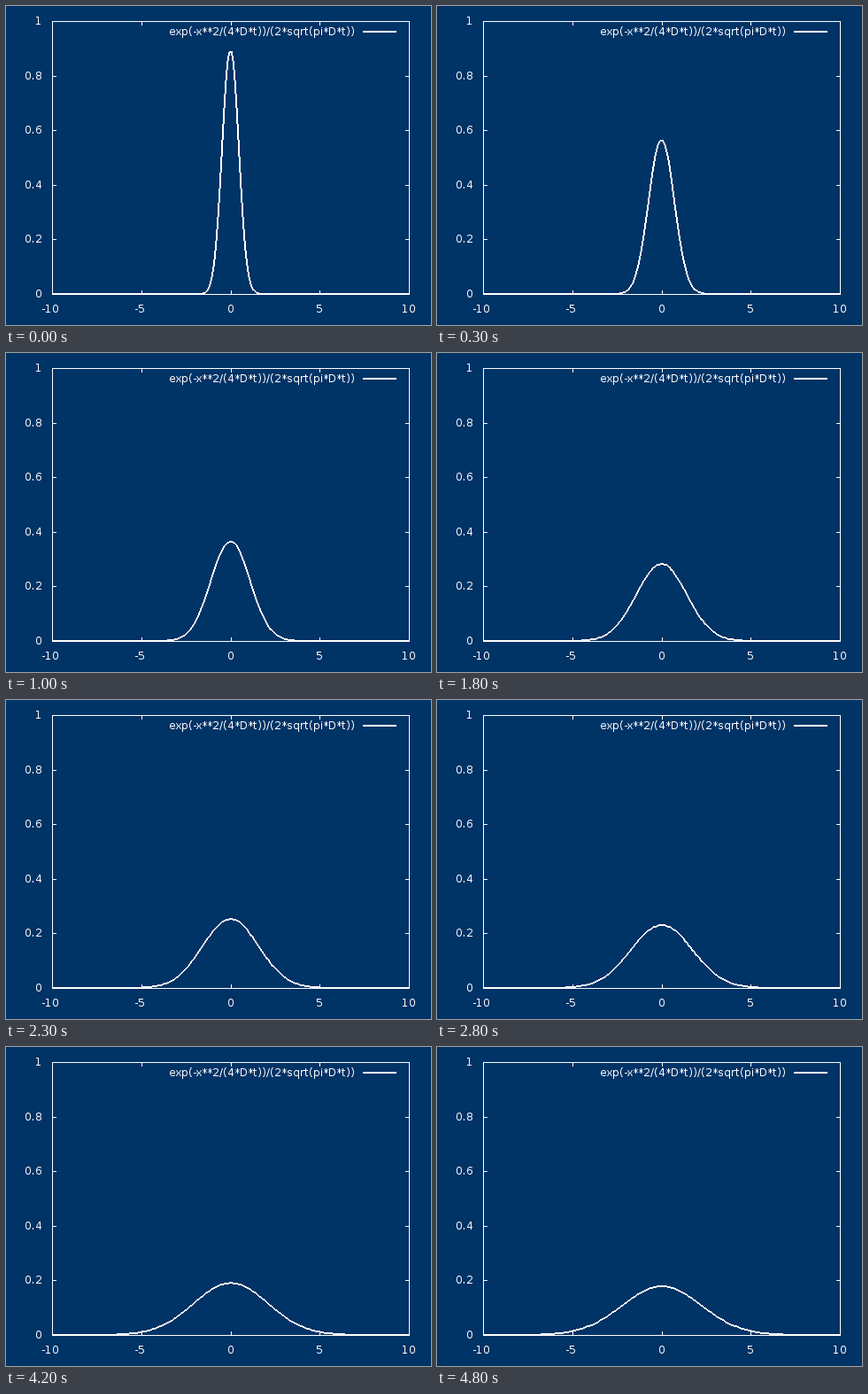
Recreate the animation shown at these times as a matplotlib script. Size 480 by 360 pixels, loop 4900 ms.

```python
import numpy as np
import matplotlib.pyplot as plt
from matplotlib.animation import FuncAnimation
from matplotlib.collections import PolyCollection

W, H, DPI = 480, 360, 100
FRAMES, STEP = 49, 100
LEFT, RIGHT, TOP, BOTTOM = 52, 455, 17, 325
TICK = 4
NAVY = "#003366"

plt.rcParams.update({
    "font.family": "DejaVu Sans",
    "font.size": 12 * 72 / DPI,
    "text.color": "white",
    "text.hinting": "native",
    "text.hinting_factor": 1,
})


def px(x):
    return LEFT + np.floor((x + 10) / 20 * (RIGHT - LEFT) + 0.5).astype(int)


def py(y):
    return BOTTOM - np.floor(y * (BOTTOM - TOP) + 0.5).astype(int)


def box(x0, y0, x1, y1):
    """Rectangle covering whole pixels, both ends included."""
    return [(x0, y0), (x1 + 1, y0), (x1 + 1, y1 + 1), (x0, y1 + 1)]


def trace(xs, ys):
    """Two-pixel-wide stepped line through integer points."""
    boxes = []
    for x0, y0, x1, y1 in zip(xs, ys, xs[1:], ys[1:]):
        dx, dy = x1 - x0, y1 - y0
        if dy == 0:
            boxes.append(box(x0, y0 - 1, x1, y0))
        elif abs(dy) <= abs(dx):
            for x in range(x0, x1 + 1):
                y = int(np.floor(y0 + dy * (x - x0) / dx + 0.5))
                boxes.append(box(x, y - 1, x, y))
        else:
            for y in range(min(y0, y1), max(y0, y1) + 1):
                x = int(np.floor(x0 + dx * (y - y0) / dy + 0.5))
                boxes.append(box(x - 1, y, x, y))
    return boxes


def heat(x, dt):
    return np.exp(-x**2 / (4 * dt)) / (2 * np.sqrt(np.pi * dt))


fig = plt.figure(figsize=(W / DPI, H / DPI), dpi=DPI, facecolor=NAVY)
ax = fig.add_axes([0, 0, 1, 1])
ax.set_xlim(0, W)
ax.set_ylim(H, 0)
ax.axis("off")


def paint(boxes):
    return ax.add_collection(
        PolyCollection(boxes, facecolors="white", edgecolors="none", snap=False),
        autolim=False)


frame = [
    box(LEFT, TOP, RIGHT, TOP), box(LEFT, BOTTOM, RIGHT, BOTTOM),
    box(LEFT, TOP, LEFT, BOTTOM), box(RIGHT, TOP, RIGHT, BOTTOM),
]

for v in (-10, -5, 0, 5, 10):
    x = int(px(np.float64(v)))
    frame += [box(x, TOP, x, TOP + TICK), box(x, BOTTOM - TICK, x, BOTTOM)]
    ax.text(x - 2 * (v < 0), 346, str(v), ha="center", va="baseline")

for v in (0, 0.2, 0.4, 0.6, 0.8, 1):
    y = int(py(np.float64(v)))
    frame += [box(LEFT, y, LEFT + TICK, y), box(RIGHT - TICK, y, RIGHT, y)]
    ax.text(41, y + 4, f"{v:g}", ha="right", va="baseline")

ax.text(184, 33, "exp(-x**2/(4*D*t))/(2*sqrt(pi*D*t))", va="baseline")
frame.append(box(403, 28, 440, 29))
paint(frame)

grid = np.linspace(-10, 10, 200)
cols = px(grid).tolist()
curve = paint([])


def update(i):
    rows = py(heat(grid, 0.1 + 0.05 * i)).tolist()
    curve.set_verts(np.array(trace(cols, rows), dtype=float))
    return (curve,)


anim = FuncAnimation(fig, update, frames=FRAMES, interval=STEP,
                     repeat=True, repeat_delay=0)
plt.show()
```
